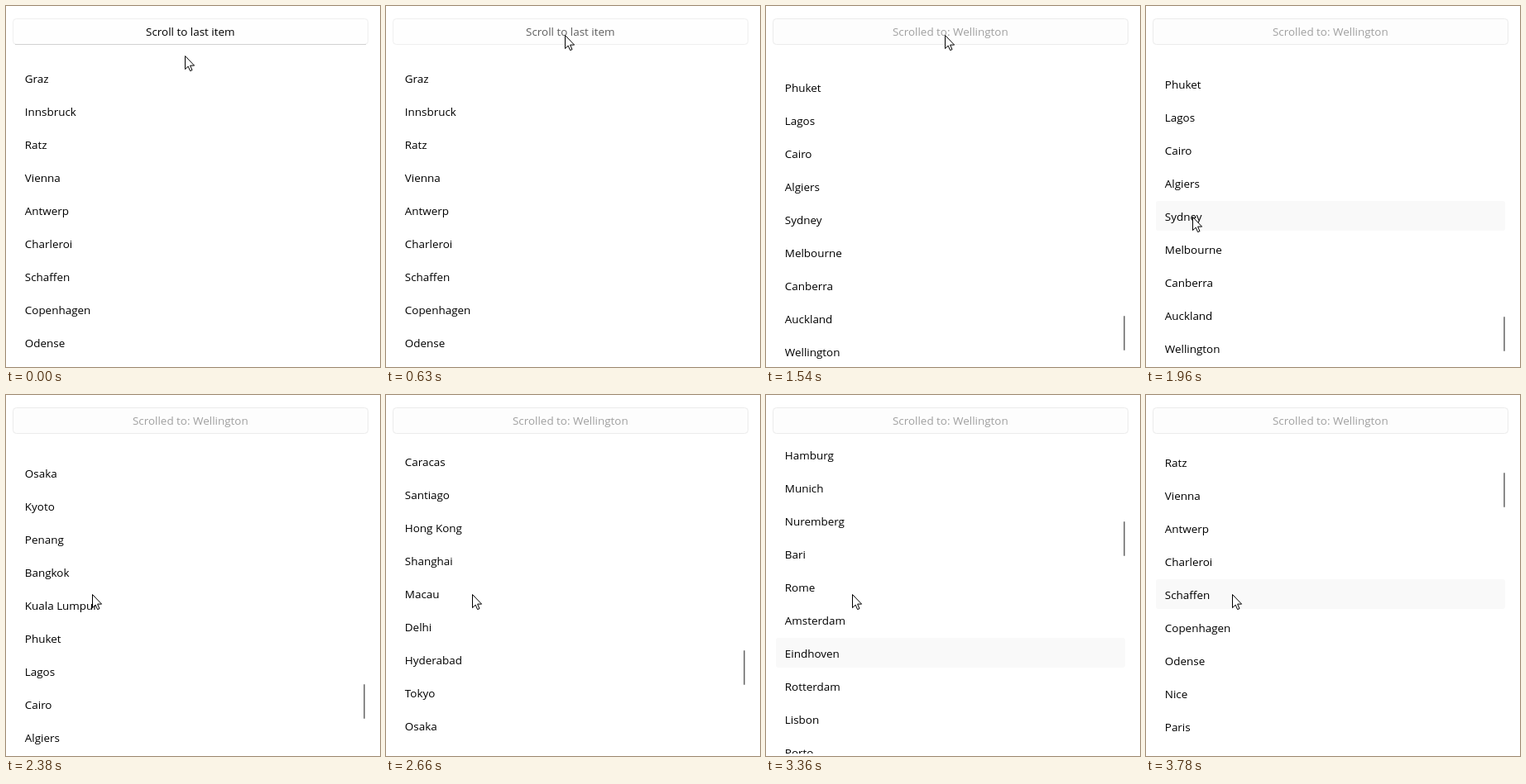
These frames come from a looping animation (452 px wide and 437 px high, 4200 ms). An HTML page:

```html
<!DOCTYPE html>
<html lang="en">
<head>
<meta charset="utf-8">
<title>Scroll to last item</title>
<style>
  html, body { margin: 0; width: 100%; height: 100%; overflow: hidden; background: #fff; }
  svg { display: block; width: 100%; height: 100%; }
  text { font: 13.45px "Open Sans", "Noto Sans", sans-serif; }
</style>
</head>
<body>
<svg viewBox="0 0 452 437" xmlns="http://www.w3.org/2000/svg">
  <defs>
    <clipPath id="view"><rect x="8" y="67" width="430" height="367"/></clipPath>
  </defs>
  <rect id="button" x="8.5" y="15.5" width="429" height="31" rx="4" fill="#fefefe"/>
  <path id="edge" d="M11 46.5H435" stroke="#d2d2d2"/>
  <text id="label" x="222.8" y="36" text-anchor="middle"></text>
  <g clip-path="url(#view)">
    <rect id="hover" x="12" width="422" height="36" rx="3" fill="#f9f9f9"/>
    <g id="list"></g>
    <rect id="thumb" x="432" width="2" height="42" rx="1" fill="#8a8a8a"/>
  </g>
  <path id="cursor" d="M.5 .5V16.6L4.2 13.1 6.6 18.6 9 17.6 6.6 12.1H11.6Z" fill="#fff" stroke="#000"/>
</svg>
<script>
const LOOP = 4200, TICK = 70, ROW = 40, TOP = 88, END = 2233;
const cities = `Graz,Innsbruck,Ratz,Vienna,Antwerp,Charleroi,Schaffen,Copenhagen,Odense,Nice,Paris,
Baden-Baden,Berlin,Hamburg,Munich,Nuremberg,Bari,Rome,Amsterdam,Eindhoven,Rotterdam,Lisbon,Porto,
Barcelona,Madrid,London,Manchester,New York,Los Angeles,Chicago,Boston,San Francisco,Toronto,
Vancouver,Ottawa,Rio de Janeiro,Sao Paulo,Salvador,Buenos Aires,Cordoba,Lima,Bogota,Medellin,
Caracas,Santiago,Hong Kong,Shanghai,Macau,Delhi,Hyderabad,Tokyo,Osaka,Kyoto,Penang,Bangkok,
Kuala Lumpur,Phuket,Lagos,Cairo,Algiers,Sydney,Melbourne,Canberra,Auckland,Wellington`
  .split(',').map(s => s.trim());

// time, offset, speed (px per ms)
const wheel = [[2100, END, -.4], [2660, 1727, -1.15], [3080, 1137, -1.75], [3360, 535, -1.95], [3640, 86, 0]];
// start, end, x, y
const moves = [[280, 630, 216, 35], [1750, 1960, 56, 255], [2030, 2310, 104, 241]];
// start, end, row
const hovers = [[1960, 2100, 60], [3360, 3430, 19], [3640, LOOP, 6]];

const $ = id => document.getElementById(id);
const set = (id, attrs) => {
  for (const k in attrs) $(id).setAttribute(k, attrs[k]);
};
const clamp = u => Math.min(1, Math.max(0, u));
const smooth = u => u * u * (3 - 2 * u);

cities.forEach((name, i) => {
  const el = document.createElementNS('http://www.w3.org/2000/svg', 'text');
  el.setAttribute('x', 22.8);
  el.setAttribute('y', TOP + 5 + i * ROW);
  el.textContent = name;
  $('list').append(el);
});

function hermite([t0, p0, v0], [t1, p1, v1], t) {
  const d = t1 - t0, u = (t - t0) / d, w = 1 - u;
  return p0 * w * w * (1 + 2 * u) + p1 * u * u * (3 - 2 * u) + d * u * w * (v0 * w - v1 * u);
}

function scrollAt(t) {
  if (t < wheel[0][0]) return END * (1 - (1 - clamp((t - 1043.3) / 566.7)) ** 3);
  const i = wheel.findIndex(k => t < k[0]);
  return i < 0 ? wheel[wheel.length - 1][1] : hermite(wheel[i - 1], wheel[i], t);
}

function cursorAt(t) {
  let x = 216, y = 60;
  for (const [a, b, tx, ty] of moves) {
    const u = smooth(clamp((t - a) / (b - a)));
    x += (tx - x) * u;
    y += (ty - y) * u;
  }
  return [Math.round(x), Math.round(y)];
}

function draw(t) {
  const done = t >= 1050, pressed = t >= 630 && !done;
  const s = Math.round(scrollAt(t));
  $('label').textContent = done ? 'Scrolled to: Wellington' : 'Scroll to last item';
  set('label', { fill: done ? '#a0a0a0' : pressed ? '#5f5f5f' : '#000' });
  set('button', { fill: done ? '#fdfdfd' : '#fefefe', stroke: done ? '#ebebeb' : '#efefef' });
  set('edge', { opacity: done || pressed ? 0 : 1 });
  set('list', { transform: `translate(0 ${-s})` });
  set('thumb', { y: Math.round(82.7 + s * .1313), opacity: done ? 1 : 0 });
  const hit = hovers.find(([a, b]) => t >= a && t < b);
  set('hover', { y: hit ? TOP - 19 + hit[2] * ROW - s : 0, opacity: hit ? 1 : 0 });
  set('cursor', { transform: `translate(${cursorAt(t)})` });
}

const start = performance.now();
function loop() {
  const t = (performance.now() - start) % LOOP;
  draw(Math.floor(t / TICK) * TICK);
  requestAnimationFrame(loop);
}
loop();
</script>
</body>
</html>
```
